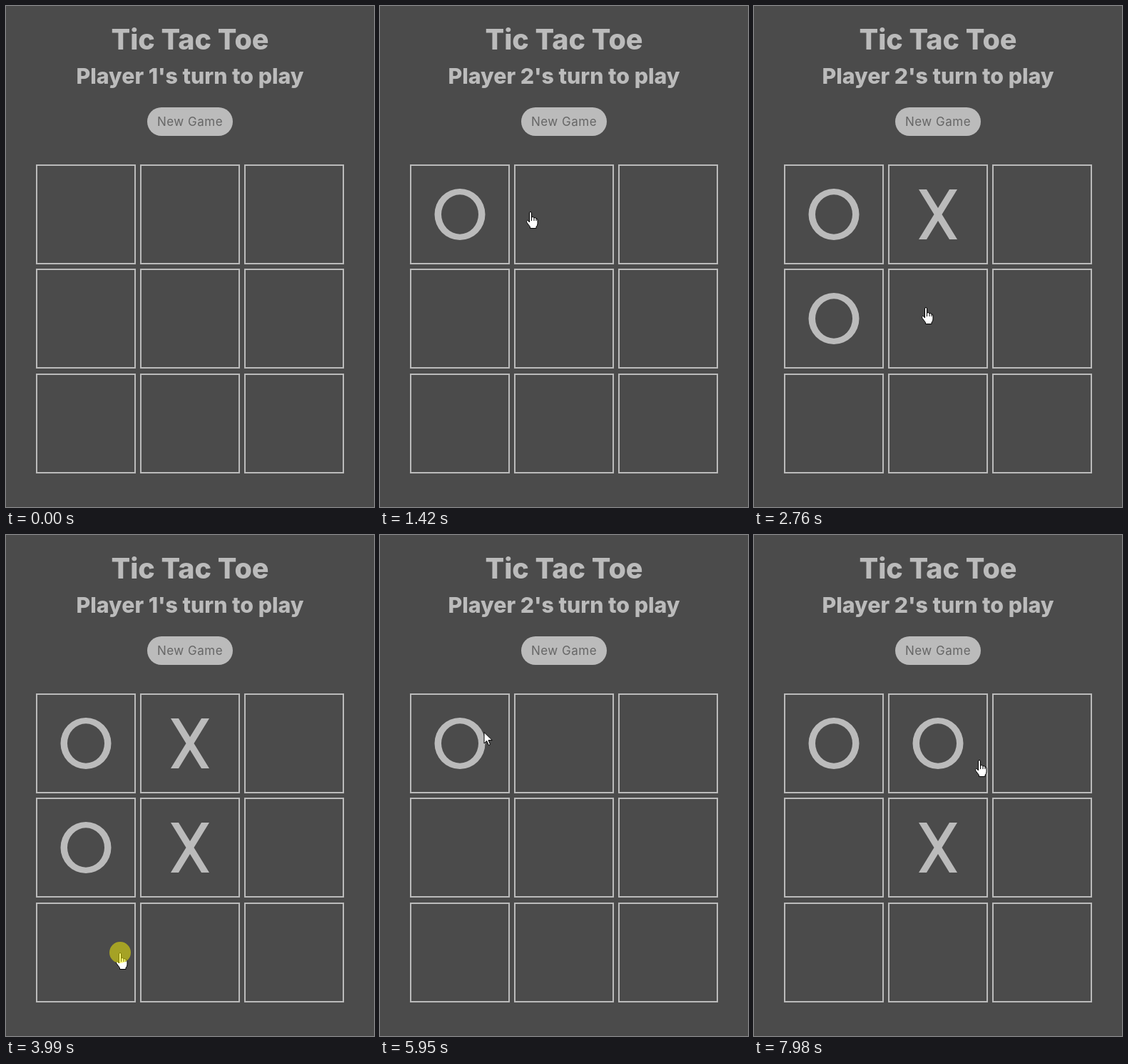
Write an HTML page with a canvas that moves like this. It is 516 px wide and 702 px high and loops after 8 s.

```html
<!DOCTYPE html>
<html lang="en">
<head>
<meta charset="utf-8">
<title>Tic Tac Toe</title>
<style>
  html, body { margin: 0; width: 100%; height: 100%; overflow: hidden; background: #4b4b4b; }
  canvas { display: block; }
</style>
</head>
<body>
<canvas id="stage" width="516" height="702"></canvas>
<script>
const ctx = document.getElementById('stage').getContext('2d');
const LOOP = 8000, TICK = 67.6;
const LEFT = 42, TOP = 222, CELL = 140, PITCH = 146.3;
const LIGHT = '#bbb', DARK = '#4b4b4b';

// pointer moves; a move with a release time ends in a click
const move = (leave, arrive, x, y, release) => ({ leave, arrive, x, y, release, cell: cellAt(x, y) });
const moves = [
  move(0, 260, 336, 635),
  move(260, 640, 11, 440),
  move(640, 940, 115, 276, 1080),
  move(1080, 1572, 240, 291, 1750),
  move(1885, 2285, 145, 420, 2420),
  move(2555, 2755, 241, 422, 3300),
  move(3435, 3915, 160, 585, 4120),
  move(4465, 5005, 247, 151, 5280),
  move(5280, 5680, 146, 276, 5950),
  move(6085, 6555, 241, 385, 6690),
  move(7085, 7425, 262, 314, 7720),
  move(7912, 7970, 316, 315),
];
const clicks = moves.filter(m => m.release);
const reset = clicks.find(m => m.cell < 0);

const lines = [[0, 4, 8], [2, 4, 6]];
for (let i = 0; i < 3; i++) lines.push([3 * i, 3 * i + 1, 3 * i + 2], [i, i + 3, i + 6]);

const cross = new Path2D('M43 35h11l43 70h-11zM86 35h11l-43 70h-11z');
const ring = new Path2D();
ring.ellipse(70, 70, 35.5, 36, 0, 0, 2 * Math.PI);
ring.closePath();
ring.moveTo(96, 70);
ring.ellipse(70, 70, 26, 27.7, 0, 0, 2 * Math.PI);
const arrow = new Path2D('M0 .5V16L3.7 12.5 6.3 18.5 8.6 17.5 6 11.6H11.3Z');
const hand = new Path2D('M-1.5 15V2Q-1.5.5 0 .5T1.5 2V8Q4.5 6.5 5 9 7.5 7.5 8 10 10 9.5 10 12V17' +
  'Q10 19.5 8 21.5V23.5H-.5V21.5Q-3 18-5 15.5-6 13-4.5 12.5-3 12-1.5 15Z' +
  'M1.5 8V13M5 9V13M8 10V13');

function cellAt(x, y) {
  const col = Math.floor((x - LEFT) / PITCH), row = Math.floor((y - TOP) / PITCH);
  return col >= 0 && col < 3 && row >= 0 && row < 3 ? row * 3 + col : -1;
}

function gameAt(t) {
  let board = [], turn = 0;
  for (const { release, cell } of clicks) {
    if (t < release) break;
    if (cell < 0) { board = []; turn = 0; }
    else { board[cell] = 'OX'[turn]; turn = 1 - turn; }
  }
  const win = lines.find(([a, b, c]) => board[a] && board[a] === board[b] && board[a] === board[c]) || [];
  const status = win.length ? `Player ${2 - turn} wins` : `Player ${turn + 1}'s turn to play`;
  return { board, win, status };
}

function pointerAt(t) {
  let { x, y } = moves[0];
  for (const m of moves) {
    const u = Math.min(1, Math.max(0, (t - m.leave) / (m.arrive - m.leave)));
    const k = u * u * (3 - 2 * u);
    x += (m.x - x) * k;
    y += (m.y - y) * k;
  }
  return [Math.round(x), Math.round(y)];
}

function label(text, y, font, color, spacing = '0px') {
  ctx.font = `${font} Inter, sans-serif`;
  ctx.letterSpacing = spacing;
  ctx.fillStyle = color;
  ctx.fillText(text, 258, y);
}

function drawCell(i, mark, won) {
  ctx.save();
  ctx.translate(LEFT + i % 3 * 146, TOP + Math.round(Math.floor(i / 3) * PITCH));
  ctx.fillStyle = won ? '#363636' : DARK;
  ctx.fillRect(0, 0, CELL, CELL);
  ctx.strokeStyle = ctx.fillStyle = LIGHT;
  ctx.lineWidth = 2;
  ctx.strokeRect(1, 1, CELL - 2, CELL - 2);
  if (mark) ctx.fill(mark === 'X' ? cross : ring, mark === 'X' ? 'nonzero' : 'evenodd');
  ctx.restore();
}

function drawPointer(t) {
  const [x, y] = pointerAt(Math.floor((t + 13) / TICK) * TICK);
  const afterReset = t >= reset.release && t < 6150;
  const shape = cellAt(x, y) >= 0 && !afterReset ? hand : arrow;
  ctx.save();
  ctx.translate(x, y);
  ctx.fillStyle = '#fff';
  ctx.strokeStyle = '#000';
  ctx.lineWidth = 1;
  ctx.fill(shape);
  ctx.stroke(shape);
  if (clicks.some(m => t < m.release && t >= m.release - (m === reset ? 200 : 130))) {
    ctx.fillStyle = 'rgba(255, 250, 0, .5)';
    ctx.beginPath();
    ctx.arc(0, 0, 15, 0, 7);
    ctx.fill();
  }
  ctx.restore();
}

function draw(now) {
  const t = now % LOOP;
  const { board, win, status } = gameAt(t);
  ctx.fillStyle = DARK;
  ctx.fillRect(0, 0, 516, 702);
  ctx.textAlign = 'center';
  label('Tic Tac Toe', 61, '800 39.5px', LIGHT);
  label(status, 109, '800 30.3px', LIGHT);
  ctx.beginPath();
  ctx.roundRect(198, 142, 120, 40, 20);
  ctx.fill();
  label('New Game', 168, '400 17px', '#666', '0.5px');
  for (let i = 0; i < 9; i++) drawCell(i, board[i], win.includes(i));
  if (t >= 260) drawPointer(t);
  requestAnimationFrame(draw);
}
requestAnimationFrame(draw);
</script>
</body>
</html>
```
